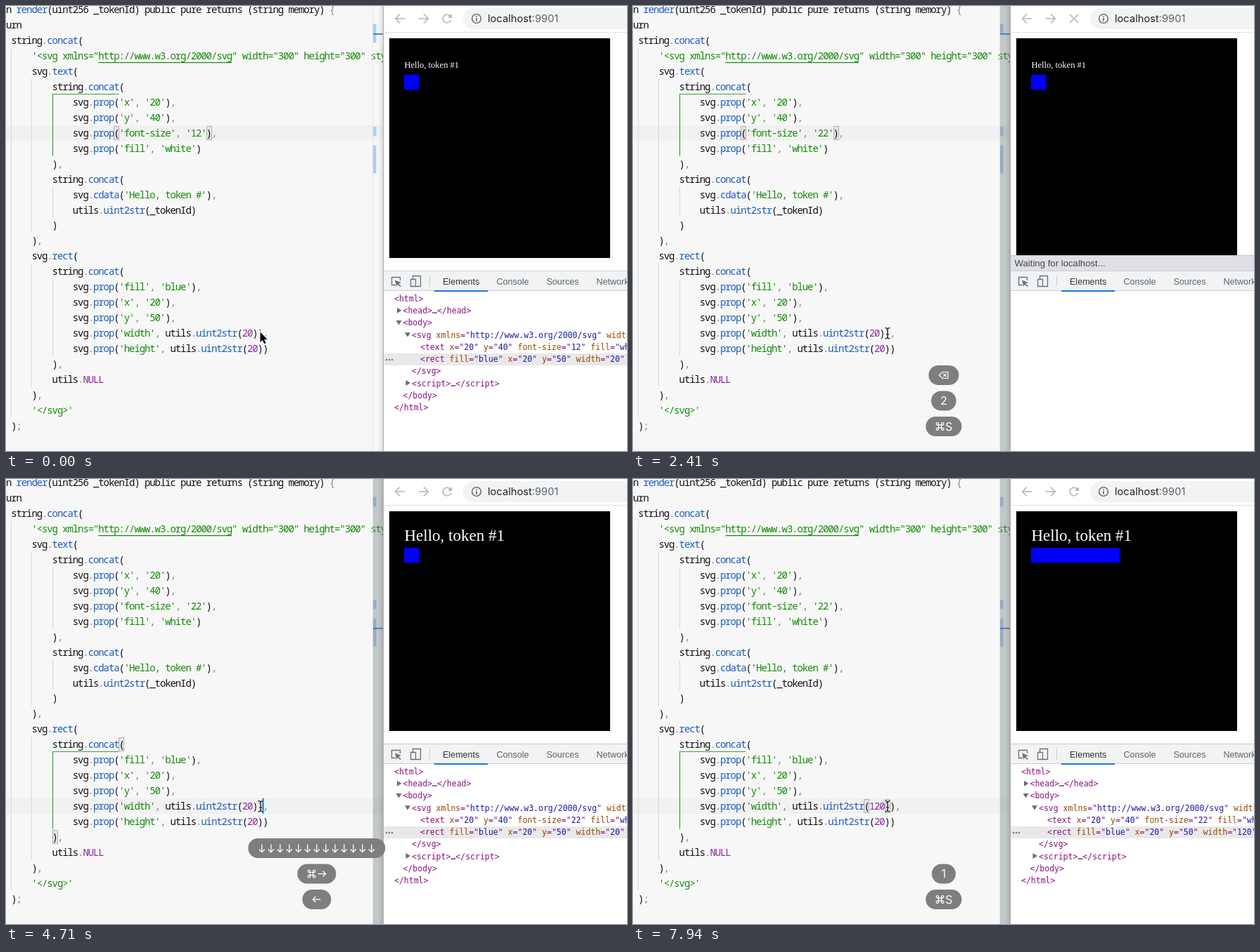
An HTML page with a canvas that plays this animation: 883 px wide and 634 px high, repeating every 8000 ms.

```html
<!DOCTYPE html>
<html lang="en">
<head>
<meta charset="utf-8">
<title>Live SVG coding</title>
<style>
html, body { margin: 0; width: 100%; height: 100%; overflow: hidden; background: #fff; }
canvas { display: block; width: 883px; height: 634px; }
</style>
</head>
<body>
<canvas id="stage" width="883" height="634"></canvas>
<script>
const ctx = document.getElementById('stage').getContext('2d');
const LOOP = 8000, CW = 7.3, LH = 21.94, EDGE = 536;
const CODE = '500 14px "Noto Sans Mono", monospace';
const SANS = '"Liberation Sans", sans-serif';
const MONO = '11.5px "DejaVu Sans Mono", monospace';

const colX = c => 7.2 + c * CW;
const rowY = r => -6 + r * LH;
const rulerY = r => 39 + (r - 8) * 13.3;
const within = (t, a, b) => t >= a && t < b;
const latest = (list, t) => list.filter(e => e[0] <= t).pop();

function rect(x, y, w, h, color) {
  ctx.fillStyle = color;
  ctx.fillRect(x, y, w, h);
}
function text(s, x, y, font, color) {
  ctx.font = font;
  ctx.fillStyle = color;
  ctx.fillText(s, x, y);
}
function line(points, color, width = 1, close = false) {
  ctx.beginPath();
  points.forEach(([x, y]) => ctx.lineTo(x, y));
  if (close) ctx.closePath();
  ctx.strokeStyle = color;
  ctx.lineWidth = width;
  ctx.stroke();
}
function ring(x, y, r, color, width) {
  ctx.beginPath();
  ctx.arc(x, y, r, 0, 7);
  ctx.strokeStyle = color;
  ctx.lineWidth = width;
  ctx.stroke();
}
function poly(points, color) {
  ctx.beginPath();
  points.forEach(([x, y]) => ctx.lineTo(x, y));
  ctx.closePath();
  ctx.fillStyle = color;
  ctx.fill();
}

// ---- editor ----

// Each entry: start column, code
const codeRows = (size, width) => [
  [-8, 'function render(uint256 _tokenId) public pure returns (string memory) {'],
  [-4, 'return'],
  [0, 'string.concat('],
  [4, `'<svg xmlns="http://www.w3.org/2000/svg" width="300" height="300" style="`],
  [4, 'svg.text('],
  [8, 'string.concat('],
  [12, "svg.prop('x', '20'),"],
  [12, "svg.prop('y', '40'),"],
  [12, `svg.prop('font-size', '${size}'),`],
  [12, "svg.prop('fill', 'white')"],
  [8, '),'],
  [8, 'string.concat('],
  [12, "svg.cdata('Hello, token #'),"],
  [12, 'utils.uint2str(_tokenId)'],
  [8, ')'],
  [4, '),'],
  [4, 'svg.rect('],
  [8, 'string.concat('],
  [12, "svg.prop('fill', 'blue'),"],
  [12, "svg.prop('x', '20'),"],
  [12, "svg.prop('y', '50'),"],
  [12, `svg.prop('width', utils.uint2str(${width})),`],
  [12, "svg.prop('height', utils.uint2str(20))"],
  [8, '),'],
  [8, 'utils.NULL'],
  [4, '),'],
  [4, "'</svg>'"],
  [0, ');']
];
const TOKEN = /('[^']*'?)|(\b(?:render|text|concat|prop|cdata|rect|uint2str)(?=\())|(\bNULL\b|\b\d+\b)|([.,;{}])|[^'.,;{}\s]+?(?=\b|\W)|\S/g;
const tokenColor = m =>
  m[1] ? '#168a0a' : m[2] ? '#1f5cb8' : m[3] ? '#8a2aa6' : m[4] ? '#858585' : '#111';

// Block scopes: opening row, guide column, last row, bracket column
const SCOPES = {
  outer: [2, 0, 26, 13], label: [4, 4, 14, 12], labelProps: [5, 8, 9, 21],
  labelBody: [11, 8, 13, 21], box: [16, 4, 24, 12], boxProps: [17, 8, 22, 21]
};
function scopeAt(row) {
  if (row < 10) return SCOPES.labelProps;
  if (row > 16) return SCOPES.boxProps;
  if (row === 16) return SCOPES.box;
  if (row === 15) return SCOPES.outer;
  return row === 10 || row === 14 ? SCOPES.label : SCOPES.labelBody;
}

// Time, then row and column of both matching brackets
const BRACKETS = [
  [0, 8, 20, 8, 38], [710, 8, 20, 8, 37], [1470, 8, 20, 8, 38], [3240, 9, 20, 9, 36],
  [3940, 17, 21, 23, 8], [4180, 21, 20, 21, 48], [4470, 17, 21, 23, 8],
  [4760, 21, 20, 21, 48], [5000, 21, 44, 21, 47], [6410, 21, 44, 21, 48]
];
const BLINKS = [240, 1290, 1470, 1940, 2470, 2940, 3180, 5530, 6060, 6940, 7410, 7940];

function downCount(t) {
  if (t < 3180) return 0;
  if (t < 3470) return 1;
  if (t < 4120) return Math.min(12, 2 + 2 * Math.floor((t - 3470) / 60));
  return 13;
}
const leftCount = t => [4710, 4940, 5000, 5060, 5120].filter(p => p <= t).length;

function caretAt(t, rows) {
  const lag = within(t, 3470, 3820) ? 1 : 0;
  const row = 8 + downCount(t) - lag;
  let col = within(t, 710, 1470) ? 35 : 36;
  if (t >= 4410) col = 50 - leftCount(t);
  if (t >= 6410) col = 46;
  return { row, col: Math.min(col, rows[row][0] + rows[row][1].length) };
}

function drawCode(rows) {
  ctx.font = CODE;
  ctx.fontStretch = 'condensed';
  ctx.letterSpacing = '0px';
  ctx.letterSpacing = (CW - ctx.measureText('0').width) + 'px';
  rows.forEach(([col, code], r) => {
    for (const m of code.matchAll(TOKEN)) {
      ctx.fillStyle = tokenColor(m);
      ctx.fillText(m[0], colX(col + m.index), Math.round(rowY(r) + 16.3));
    }
  });
  ctx.letterSpacing = '0px';
  ctx.fontStretch = 'normal';
  rect(colX(17), 80, 26 * CW, 1.2, '#168a0a');
}

function drawGuides(active) {
  for (const [row, col, last] of Object.values(SCOPES))
    rect(Math.round(colX(col)), rowY(row + 1), 1, (last - row) * LH, '#d6d6d6');
  const [row, col, last, open] = active;
  const x = Math.round(colX(col)) + 0.5, y = Math.round(rowY(row + 1)) - 0.5;
  line([[colX(open), y], [x, y], [x, rowY(last + 1)]], '#3f9d3f', 1.2);
}

function drawRuler(t, caretRow) {
  rect(521, 0, 1, 634, '#e6e6e6');
  const mark = (a, b) => rect(522, rulerY(a), 4.5, rulerY(b) - rulerY(a), '#afcdf0');
  mark(7, t < 1710 ? 9 : 8);
  mark(18, 19);
  mark(20, 23);
  const shade = Math.max(0, Math.min(1, (t - 650) / 230));
  rect(522, 0, 14, 634, `rgba(100,114,118,${0.36 * shade})`);
  const note = r => rect(527, rulerY(r), 4.5, 13.3, '#8c9192');
  if (within(t, 3240, 3940)) note(9);
  if (within(t, 5290, 6410)) [6, 19, 21, 22].forEach(note);
  rect(522, rulerY(caretRow), 14, 1.8, '#3f7cc4');
}

function drawEditor(t) {
  const size = t < 710 ? '12' : t < 1470 ? '2' : '22';
  const rows = codeRows(size, t < 6410 ? '20' : '120');
  const caret = caretAt(t, rows);
  ctx.save();
  ctx.beginPath();
  ctx.rect(0, 0, EDGE, 634);
  ctx.clip();
  rect(0, 0, EDGE, 634, '#f7f7f7');
  rect(0, Math.round(rowY(caret.row)), EDGE, 22, '#f1f1f1');
  drawGuides(scopeAt(caret.row));
  if (within(t, 5290, 6410))
    for (const [r, c] of [[6, 27], [19, 27], [21, 45], [22, 46]])
      rect(colX(c), rowY(r) + 1, 2 * CW, 20, '#e3e3e3');
  const [, r1, c1, r2, c2] = latest(BRACKETS, t);
  for (const [r, c] of [[r1, c1], [r2, c2]]) {
    const x = Math.round(colX(c)), y = Math.round(rowY(r)) + 1;
    rect(x, y, 8, 20, '#b4b4b4');
    rect(x + 1, y + 1, 6, 18, '#e4e4e4');
  }
  drawCode(rows);
  if (BLINKS.filter(b => b <= t).length % 2)
    rect(colX(caret.col) - 0.5, rowY(caret.row), 2.2, 22, '#1d7bd8');
  drawRuler(t, caret.row);
  const shadow = ctx.createLinearGradient(529, 0, EDGE, 0);
  shadow.addColorStop(0, 'rgba(0,0,0,0)');
  shadow.addColorStop(1, 'rgba(0,0,0,.1)');
  rect(529, 0, 7, 634, shadow);
  ctx.restore();
}

// ---- browser ----

const LOADS = [
  { start: 2060, blank: 2410, page: 2530, tree: 2640, done: 2700 },
  { start: 6710, blank: 7240, page: 7300, tree: 7350, done: 7410 }
];

function drawToolbar(loading) {
  const grey = '#b3b6ba';
  line([[567, 18], [554, 18]], grey, 1.6);
  line([[560, 11.5], [553.7, 18], [560, 24.5]], grey, 1.6);
  line([[587, 18], [600, 18]], grey, 1.6);
  line([[594, 11.5], [600.3, 18], [594, 24.5]], grey, 1.6);
  if (loading) {
    line([[621, 12], [633, 24]], grey, 1.6);
    line([[633, 12], [621, 24]], grey, 1.6);
  } else {
    ctx.beginPath();
    ctx.arc(627, 18, 5.8, 0.3, 5.6);
    ctx.strokeStyle = grey;
    ctx.lineWidth = 1.6;
    ctx.stroke();
    poly([[634, 11], [634, 17], [628, 17]], grey);
  }
  ctx.beginPath();
  ctx.roundRect(650, 3, 300, 30, 15);
  ctx.fillStyle = '#f1f3f4';
  ctx.fill();
  ring(669, 18, 6.4, '#5f6368', 1.4);
  rect(668.2, 17, 1.6, 4.6, '#5f6368');
  rect(668.2, 14.2, 1.6, 1.6, '#5f6368');
  const font = '14.7px Inter, sans-serif';
  text('localhost', 685, 23, font, '#202124');
  text(':9901', 685 + ctx.measureText('localhost').width, 23, font, '#5f6368');
  rect(537, 37, 346, 1, '#dfe1e4');
}

function drawPage(size, width) {
  const k = 314 / 300, x = 545.5, y = 46;
  rect(545, y, 314, 313, '#000');
  text('Hello, token #1', x + 20 * k, y + 40 * k, `${size * k}px "Liberation Serif", serif`, '#fff');
  rect(566, 98, width * k + 0.5, 21.3, '#00f');
}

function drawTabs() {
  rect(537, 378, 346, 28, '#f1f3f4');
  rect(537, 377, 346, 1, '#cbced2');
  rect(537, 405, 346, 1, '#cbced2');
  const grey = '#6c7074';
  line([[554, 397.5], [548.5, 397.5], [548.5, 386.5], [560.5, 386.5], [560.5, 391]], grey, 1.3);
  poly([[553, 390.5], [562, 394], [558.3, 395.4], [561.8, 399], [560.6, 400.2], [557, 396.6], [555.6, 400]], grey);
  line([[578.5, 389], [578.5, 384.5], [589.5, 384.5], [589.5, 399.5], [583, 399.5]], grey, 1.3);
  line([[575.5, 389.5], [582.5, 389.5], [582.5, 399.5], [575.5, 399.5]], grey, 1.3, true);
  rect(602, 384, 1, 16, '#cbced2');
  const font = `12.56px ${SANS}`;
  text('Elements', 621, 397, font, '#303236');
  [['Console', 697.5], ['Sources', 768.5], ['Network', 839.5]]
    .forEach(([s, x]) => text(s, x, 397, font, '#5f6368'));
  rect(609, 405, 76, 2, '#1a73e8');
}

const MARKUP = /(\s[\w-]+)(?==")|(="|"(?=\s|>|$))|([^\s"<>=]+(?=")|…)|<?\/?\w+>?|>/g;
function drawMarkup(s, x, y) {
  ctx.font = MONO;
  const w = ctx.measureText('0').width;
  for (const m of s.matchAll(MARKUP)) {
    ctx.fillStyle = m[0] === '…' ? '#222' : m[1] ? '#994500' : m[3] ? '#1a1aa6' : '#881280';
    ctx.fillText(m[0], x + m.index * w, y);
  }
}

function drawTree(size, width) {
  const lines = [
    [552, '<html>'], [564.5, '<head>…</head>', '>'], [564.5, '<body>', 'v'],
    [577, '<svg xmlns="http://www.w3.org/2000/svg" width="300"', 'v'],
    [589, `<text x="20" y="40" font-size="${size}" fill="white"`],
    [589, `<rect fill="blue" x="20" y="50" width="${width}" height="20"`],
    [577, '</svg>'], [577, '<script>…<\/script>', '>'], [564.5, '</body>'], [552, '</html>']
  ];
  rect(537, 495, 346, 17, '#e9e9e9');
  for (const x of [541, 545, 549]) {
    ctx.beginPath();
    ctx.arc(x, 504, 1.3, 0, 7);
    ctx.fillStyle = '#777';
    ctx.fill();
  }
  lines.forEach(([x, s, fold], i) => {
    const y = 417 + i * 17.22;
    drawMarkup(s, x, Math.round(y + 4));
    if (fold === '>') poly([[x - 8.5, y - 4.5], [x - 2, y - 0.5], [x - 8.5, y + 3.5]], '#6e6e6e');
    if (fold === 'v') poly([[x - 10, y - 3.5], [x - 2, y - 3.5], [x - 6, y + 3]], '#6e6e6e');
  });
}

function drawBrowser(t) {
  const [first, second] = LOADS;
  const active = LOADS.find(l => within(t, l.start, l.done));
  const state = key => [t < first[key] ? 12 : 22, t < second[key] ? 20 : 120];
  ctx.save();
  ctx.beginPath();
  ctx.rect(EDGE, 0, 347, 634);
  ctx.clip();
  rect(EDGE, 0, 347, 634, '#fff');
  drawToolbar(active);
  drawPage(...state('page'));
  drawTabs();
  if (!active || !within(t, active.blank, active.tree)) drawTree(...state('tree'));
  if (active && t < active.tree) {
    rect(537, 355, 346, 22, '#dfe0e5');
    rect(537, 355, 346, 1, '#c4c6cb');
    text('Waiting for localhost...', 542.5, 371, `13.2px ${SANS}`, '#45474b');
  }
  rect(EDGE, 0, 1, 634, '#a8a8a8');
  ctx.restore();
}

// ---- pressed keys ----

const KEY_X = 441.8;
const ADVANCE = { '←': 14.8, '→': 14.5, '↓': 13, '⌘': 14.5, '⌫': 17, S: 10.5, 1: 8, 2: 9.5 };
const KEYS = [
  { from: 710, to: 2640, label: () => '⌫' },
  { from: 1470, to: 3180, label: () => '2' },
  { from: 1940, to: 3820, label: () => '⌘S' },
  { from: 3180, to: 6060, label: t => '↓'.repeat(downCount(t)) },
  { from: 4410, to: 6410, label: () => '⌘→' },
  { from: 4710, to: 6940, label: t => '←'.repeat(leftCount(t)) },
  { from: 6410, to: 9000, label: () => '1' },
  { from: 6650, to: 9000, label: () => '⌘S' }
];

function drawGlyph(g, x, y) {
  const w = ADVANCE[g], mid = x + w / 2, white = '#fff';
  if (g === '←' || g === '→') {
    const d = g === '←' ? -1 : 1, tip = mid + 5.5 * d;
    line([[mid - 5.5 * d, y], [tip, y]], white, 1.3);
    line([[tip - 4 * d, y - 4], [tip, y], [tip - 4 * d, y + 4]], white, 1.3);
  } else if (g === '↓') {
    line([[mid, y - 5.5], [mid, y + 5.5]], white, 1.3);
    line([[mid - 4, y + 1.5], [mid, y + 5.5], [mid + 4, y + 1.5]], white, 1.3);
  } else if (g === '⌫') {
    line([[mid - 6.5, y], [mid - 2, y - 4.5], [mid + 6, y - 4.5], [mid + 6, y + 4.5], [mid - 2, y + 4.5]], white, 1.2, true);
    line([[mid - 0.5, y - 2], [mid + 3.5, y + 2]], white, 1.2);
    line([[mid + 3.5, y - 2], [mid - 0.5, y + 2]], white, 1.2);
  } else if (g === '⌘') {
    for (const sx of [-1, 1]) {
      line([[mid + 2 * sx, y - 3.6], [mid + 2 * sx, y + 3.6]], white, 1.2);
      line([[mid - 3.6, y + 2 * sx], [mid + 3.6, y + 2 * sx]], white, 1.2);
      for (const sy of [-1, 1]) ring(mid + 3.7 * sx, y + 3.7 * sy, 1.7, white, 1.2);
    }
  } else {
    ctx.textAlign = 'center';
    text(g, mid, y + 5.8, '16px Inter, sans-serif', white);
    ctx.textAlign = 'left';
  }
}

function drawKeys(t) {
  const pressed = KEYS.filter(k => k.from <= t);
  pressed.forEach((key, i) => {
    if (t >= key.to + 60) return;
    const label = [...key.label(t)];
    const inner = label.reduce((sum, g) => sum + ADVANCE[g], 0);
    const y = 599 - 36.5 * (pressed.length - 1 - i);
    ctx.globalAlpha = t < key.to ? 1 : 0.5;
    ctx.beginPath();
    ctx.roundRect(KEY_X - inner / 2 - 13, y - 14, inner + 26, 28, 14);
    ctx.fillStyle = '#7e7e7e';
    ctx.fill();
    let x = KEY_X - inner / 2;
    for (const g of label) {
      drawGlyph(g, x, y);
      x += ADVANCE[g];
    }
    ctx.globalAlpha = 1;
  });
}

function drawPointer(t) {
  if (t < 770) {
    const arrow = [[0, 0], [0, 14.5], [3.3, 11.5], [5.6, 16.8], [8, 15.8], [5.7, 10.6], [10.2, 10.4]]
      .map(([x, y]) => [361.5 + x, 464.5 + y]);
    line(arrow, '#fff', 2.4, true);
    poly(arrow, '#000');
    return;
  }
  const beam = (color, width) => {
    line([[358.5, 458.5], [361, 459], [362, 460.5], [363, 459], [365.5, 458.5]], color, width);
    line([[358.5, 474], [361, 473.5], [362, 472], [363, 473.5], [365.5, 474]], color, width);
    line([[362, 460], [362, 472.5]], color, width);
    line([[360, 468], [364, 468]], color, width);
  };
  beam('rgba(255,255,255,.7)', 2.6);
  beam('#222', 1.3);
}

function frame() {
  const t = performance.now() % LOOP;
  drawEditor(t);
  drawBrowser(t);
  drawKeys(t);
  drawPointer(t);
  requestAnimationFrame(frame);
}
frame();
</script>
</body>
</html>
```
